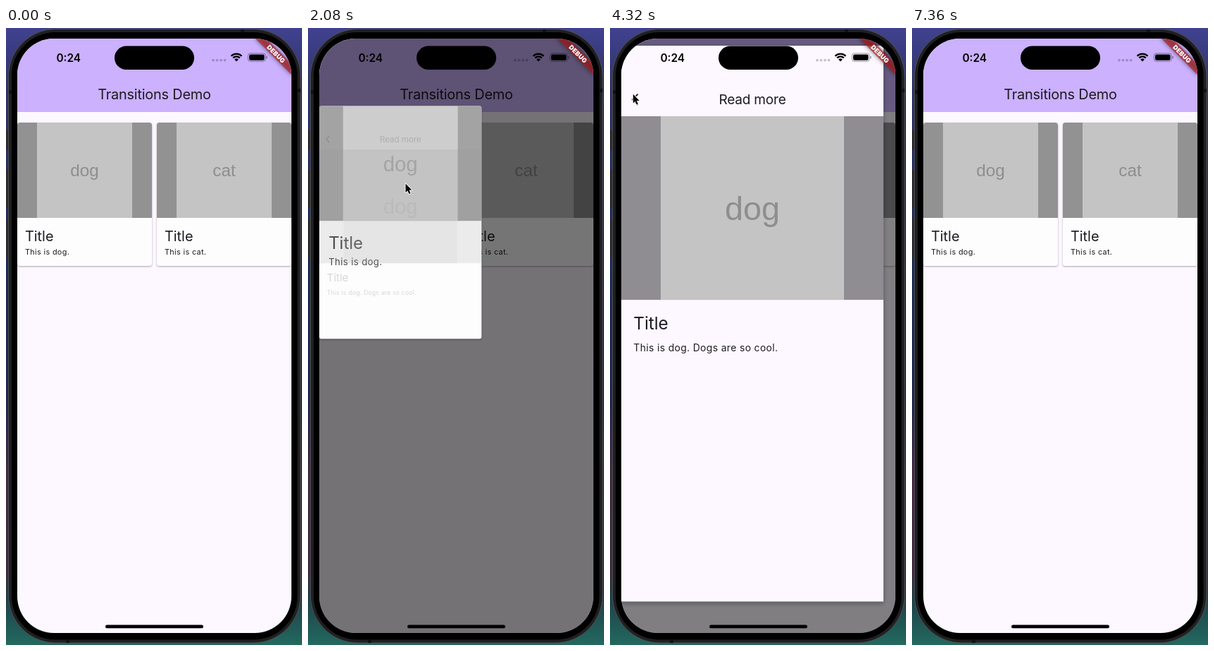
An HTML page with a canvas that plays this animation: 420 px wide and 874 px high, repeating every 7.84 s.

```html
<!DOCTYPE html>
<html lang="en">
<head>
<meta charset="utf-8">
<title>Transitions Demo</title>
<style>
html, body { margin: 0; width: 100%; height: 100%; overflow: hidden; background: #000; }
canvas { display: block; width: 420px; height: 874px; }
</style>
</head>
<body>
<canvas id="stage"></canvas>
<script>
const LOOP = 7840, STEP = 80;
const W = 389, H = 842, BAR = 104.3;             // app screen
const CARD = { x: 0, y: 119, w: 191, h: 203, r: 3.6 };
const FULL = { x: 0, y: 0, w: W, h: H, r: 0 };
const OPEN = { at: 2010, len: 300 }, CLOSE = { at: 4276, len: 263 };
const INK = '#1d1b20', PAPER = '#fdf8ff', LILAC = '#cbb1fe';
const INTER = 'Inter, sans-serif', ARIAL = '"Liberation Sans", Arial, sans-serif';

const canvas = document.getElementById('stage');
const ctx = canvas.getContext('2d');
const dpr = window.devicePixelRatio || 1;
canvas.width = 420 * dpr;
canvas.height = 874 * dpr;

const clamp = v => Math.min(1, Math.max(0, v));
const lerp = (a, b, k) => a + (b - a) * k;
const smooth = k => k * k * (3 - 2 * k);
const mixRect = (a, b, k) =>
  Object.fromEntries(Object.keys(a).map(n => [n, lerp(a[n], b[n], k)]));

// cubic-bezier(.4, 0, .2, 1)
function fastOutSlowIn(x) {
  if (x <= 0 || x >= 1) return clamp(x);
  let lo = 0, hi = 1;
  for (let i = 0; i < 24; i++) {
    const s = (lo + hi) / 2, q = 1 - s;
    if (1.2 * q * q * s + 0.6 * q * s * s + s * s * s < x) lo = s; else hi = s;
  }
  return smooth(lo);
}

function scoped(draw) {
  ctx.save();
  draw();
  ctx.restore();
}

function rect(x, y, w, h, fill) {
  ctx.fillStyle = fill;
  ctx.fillRect(x, y, w, h);
}

function round(x, y, w, h, r, fill) {
  ctx.beginPath();
  ctx.roundRect(x, y, w, h, r);
  if (fill) {
    ctx.fillStyle = fill;
    ctx.fill();
  }
}

function text(str, x, y, size, { color = INK, space = 0, weight = 400, align = 'left', family = INTER } = {}) {
  ctx.font = `${weight} ${size}px ${family}`;
  ctx.letterSpacing = space + 'px';
  ctx.textAlign = align;
  ctx.fillStyle = color;
  ctx.fillText(str, x, y);
}

function path(points, close) {
  ctx.beginPath();
  points.forEach(([x, y]) => ctx.lineTo(x, y));
  if (close) ctx.closePath();
}

function shadowed(r, fill, lift) {
  scoped(() => {
    ctx.shadowColor = 'rgba(20,10,30,.36)';
    ctx.shadowBlur = 2.5 * lift * dpr;
    ctx.shadowOffsetY = lift * dpr;
    round(r.x, r.y, r.w, r.h, r.r, fill);
  });
}

// Square placeholder picture centred on a darker band
function picture(name, y, width, size, side) {
  const mid = width / 2;
  rect(0, y, width, size, side);
  rect(mid - size / 2, y, size, size, '#c4c4c4');
  text(name, mid, y + size * 0.566, size * 0.18, { color: '#8e8e8e', align: 'center', family: ARIAL });
}

function cardContent(name) {
  picture(name, 0, CARD.w, 135, '#929292');
  text('Title', 10.9, 168, 19.9);
  text(`This is ${name}.`, 10.9, 187.3, 10.86, { space: 0.34 });
}

function clipTo(r, draw) {
  scoped(() => {
    round(r.x, r.y, r.w, r.h, r.r);
    ctx.clip();
    ctx.translate(r.x, r.y);
    draw();
  });
}

function card(name, x) {
  const r = { ...CARD, x };
  shadowed(r, '#fdfdfe', 1);
  clipTo(r, () => cardContent(name));
}

function list(withDog) {
  rect(0, 0, W, H, PAPER);
  rect(0, 0, W, 104, LILAC);
  text('Transitions Demo', W / 2, 86, 19.9, { space: -0.2, align: 'center' });
  if (withDog) card('dog', 0);
  card('cat', 198);
}

function detail() {
  rect(0, 0, W, H + 10, PAPER);
  text('Read more', W / 2, 87, 19.9, { space: -0.2, align: 'center' });
  path([[24.6, 71.6], [16.6, 79.6], [24.6, 87.6]]);
  ctx.strokeStyle = INK;
  ctx.lineWidth = 2;
  ctx.stroke();
  picture('dog', BAR, W, 272, '#8f8d91');
  text('Title', 18.1, 420, 25.3);
  text('This is dog. Dogs are so cool.', 18.1, 452.5, 14.47, { space: 0.41 });
}

function morph(pos, reveal, scrim) {
  list(false);
  rect(0, 0, W, H, `rgba(0,0,0,${scrim})`);
  const r = mixRect(CARD, FULL, pos);
  shadowed(r, reveal > 0.5 ? PAPER : '#fdfdfe', lerp(1, 3, pos));
  clipTo(r, () => {
    if (reveal < 1) scoped(() => {
      ctx.scale(r.w / CARD.w, r.w / CARD.w);
      cardContent('dog');
    });
    if (reveal > 0) scoped(() => {
      ctx.globalAlpha = reveal;
      ctx.scale(r.w / W, r.w / W);
      detail();
    });
  });
}

function app(t) {
  const o = (t - OPEN.at) / OPEN.len, c = (t - CLOSE.at) / CLOSE.len;
  if (o <= 0 || c >= 1) list(true);
  else if (o < 1) {
    const pos = fastOutSlowIn(o);
    morph(pos, clamp(o * 5 - 1), 0.54 * clamp(pos * 5));
  } else if (c <= 0) detail();
  else {
    const pos = 1 - fastOutSlowIn(c);
    morph(pos, clamp(2 - c * 5), 0.54 * pos);
  }
}

function banner() {
  scoped(() => {
    ctx.translate(W, 0);
    ctx.rotate(Math.PI / 4);
    scoped(() => {
      ctx.filter = `blur(${3.4 * dpr}px)`;
      rect(-36.2, 25.3, 72.4, 10.9, 'rgba(0,0,0,.5)');
    });
    rect(-36.2, 25.3, 72.4, 10.9, 'rgba(183,28,28,.627)');
    text('DEBUG', 0, 34.1, 9, { color: '#fff', weight: 900, align: 'center', space: 0.2 });
  });
}

function statusBar() {
  text('0:24', 71.4, 47.6, 15.4, { color: '#000', weight: 600 });
  round(154, 25.5, 113, 33.5, 16.75, '#000');
  for (let i = 0; i < 4; i++) {
    ctx.beginPath();
    ctx.arc(294 + i * 5.5, 45.6, 1.9, 0, 7);
    ctx.fillStyle = 'rgba(0,0,0,.22)';
    ctx.fill();
  }
  ctx.strokeStyle = '#000';
  ctx.lineWidth = 2.3;
  for (const r of [10.6, 6.8]) {
    ctx.beginPath();
    ctx.arc(327, 47.2, r, -Math.PI * 0.75, -Math.PI * 0.25);
    ctx.stroke();
  }
  ctx.beginPath();
  ctx.moveTo(327, 47.6);
  ctx.arc(327, 47.4, 4, -Math.PI * 0.75, -Math.PI * 0.25);
  ctx.fillStyle = '#000';
  ctx.fill();
  round(343.3, 35.9, 25, 11.4, 3.6);
  ctx.strokeStyle = 'rgba(0,0,0,.4)';
  ctx.lineWidth = 1;
  ctx.stroke();
  round(345, 37.5, 21.6, 8.2, 2.3, '#000');
  round(369.4, 39.7, 1.3, 3.8, 0.6, 'rgba(0,0,0,.4)');
}

function backdrop() {
  const g = ctx.createLinearGradient(0, 0, 0, 874);
  [[0, '#40428f'], [0.1, '#2f3268'], [0.4, '#1b2a58'], [0.6, '#1e2650'],
   [0.72, '#452746'], [0.88, '#402843'], [0.92, '#1d3e48'], [1, '#23695f']]
    .forEach(([at, color]) => g.addColorStop(at, color));
  rect(0, 0, 420, 874, g);
  for (const [y, h] of [[145, 28], [201, 54], [271, 56]]) {
    round(0, y, 5, h, 1, '#2b2b2d');
  }
}

function phone() {
  round(3.5, 1.5, 414.5, 869.5, 67, '#202022');
  ctx.strokeStyle = '#515155';
  ctx.lineWidth = 1;
  ctx.stroke();
  rect(4, 88, 4, 5, '#111');
  rect(414, 86, 4, 5, '#111');
  rect(333, 2, 5, 4, '#111');
  rect(85, 867, 5, 4, '#111');
  round(8, 6, 405.5, 860.5, 62, '#000');
}

const POINTER = [[0, 0], [0, 12.6], [2.9, 9.9], [4.9, 14.6], [7, 13.7], [5, 9.1], [8.9, 9.1]];
const MOVES = [
  { at: 640, end: 1920, from: [-12, 470], to: [138.5, 220.5] },
  { at: 3440, end: 4080, from: [138.5, 220.5], to: [32.8, 93.8] },
  { at: 4720, end: 5360, from: [32.8, 93.8], to: [-14, 112] }
];

function pointer(t) {
  const m = MOVES.filter(v => t >= v.at).pop();
  if (!m) return;
  const k = smooth(clamp((t - m.at) / (m.end - m.at)));
  scoped(() => {
    ctx.translate(lerp(m.from[0], m.to[0], k), lerp(m.from[1], m.to[1], k));
    path(POINTER, true);
    ctx.lineJoin = 'round';
    ctx.lineWidth = 1.8;
    ctx.strokeStyle = '#fff';
    ctx.stroke();
    ctx.fillStyle = '#000';
    ctx.fill();
  });
}

function draw(t) {
  ctx.setTransform(dpr, 0, 0, dpr, 0, 0);
  backdrop();
  phone();
  clipTo({ x: 16, y: 15, w: W, h: H, r: 52 }, () => {
    app(t);
    banner();
  });
  statusBar();
  round(141, 845.6, 139, 4.6, 2.3, '#000');
  pointer(t);
}

const start = performance.now();
function tick() {
  const t = (performance.now() - start) % LOOP;
  draw(Math.floor(t / STEP) * STEP);
  requestAnimationFrame(tick);
}
tick();
</script>
</body>
</html>
```
